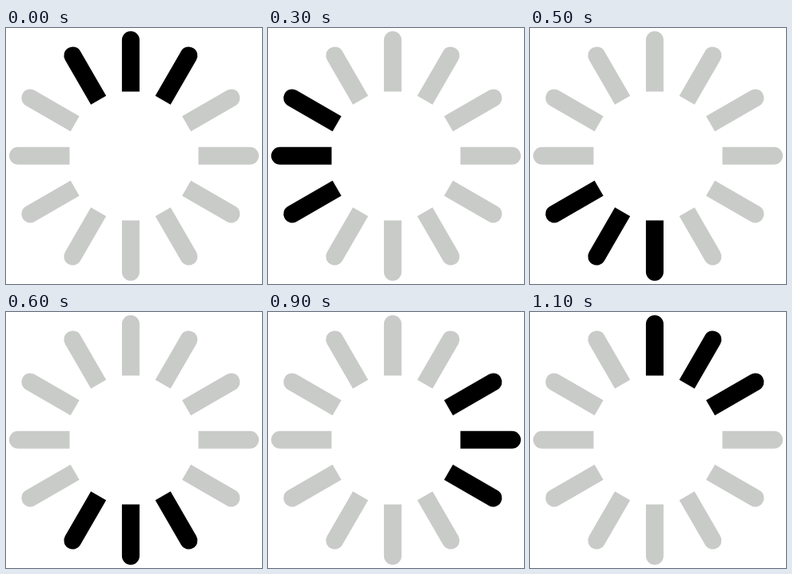
Write an HTML page with a canvas that moves like this. It is 320x320 px and loops after 1200 ms.

```html
<!DOCTYPE html>
<html lang="en">
<head>
<meta charset="utf-8">
<title>Spinner</title>
<style>
  html, body { margin: 0; width: 100%; height: 100%; overflow: hidden; background: #fff; }
  canvas { display: block; width: 320px; height: 320px; }
</style>
</head>
<body>
<canvas id="stage" width="320" height="320"></canvas>
<script>
const ctx = document.getElementById('stage').getContext('2d');
const BARS = 12, STEP = 100;
const INNER = 80.5, OUTER = 145, HALF = 11;

function drawBar(i, color) {
  // The two horizontal bars sit slightly to the right of the others.
  const flat = i % 6 === 3;
  ctx.save();
  ctx.translate(flat ? 160 : 155.9, flat ? 159.8 : 160);
  ctx.rotate(i * 2 * Math.PI / BARS);
  ctx.beginPath();
  ctx.moveTo(-HALF, -INNER);
  ctx.lineTo(-HALF, -OUTER);
  ctx.arc(0, -OUTER, HALF, Math.PI, 2 * Math.PI);
  ctx.lineTo(HALF, -INNER);
  ctx.closePath();
  ctx.fillStyle = color;
  ctx.fill();
  ctx.restore();
}

function draw(ms) {
  const step = Math.floor(ms / STEP) % BARS;
  ctx.fillStyle = '#fff';
  ctx.fillRect(0, 0, 320, 320);
  for (let i = 0; i < BARS; i++) {
    const lit = (i + step + 1) % BARS < 3;
    drawBar(i, lit ? '#000' : '#c9cbc9');
  }
}

const start = performance.now();
function tick() {
  draw(performance.now() - start);
  requestAnimationFrame(tick);
}
tick();
</script>
</body>
</html>
```
